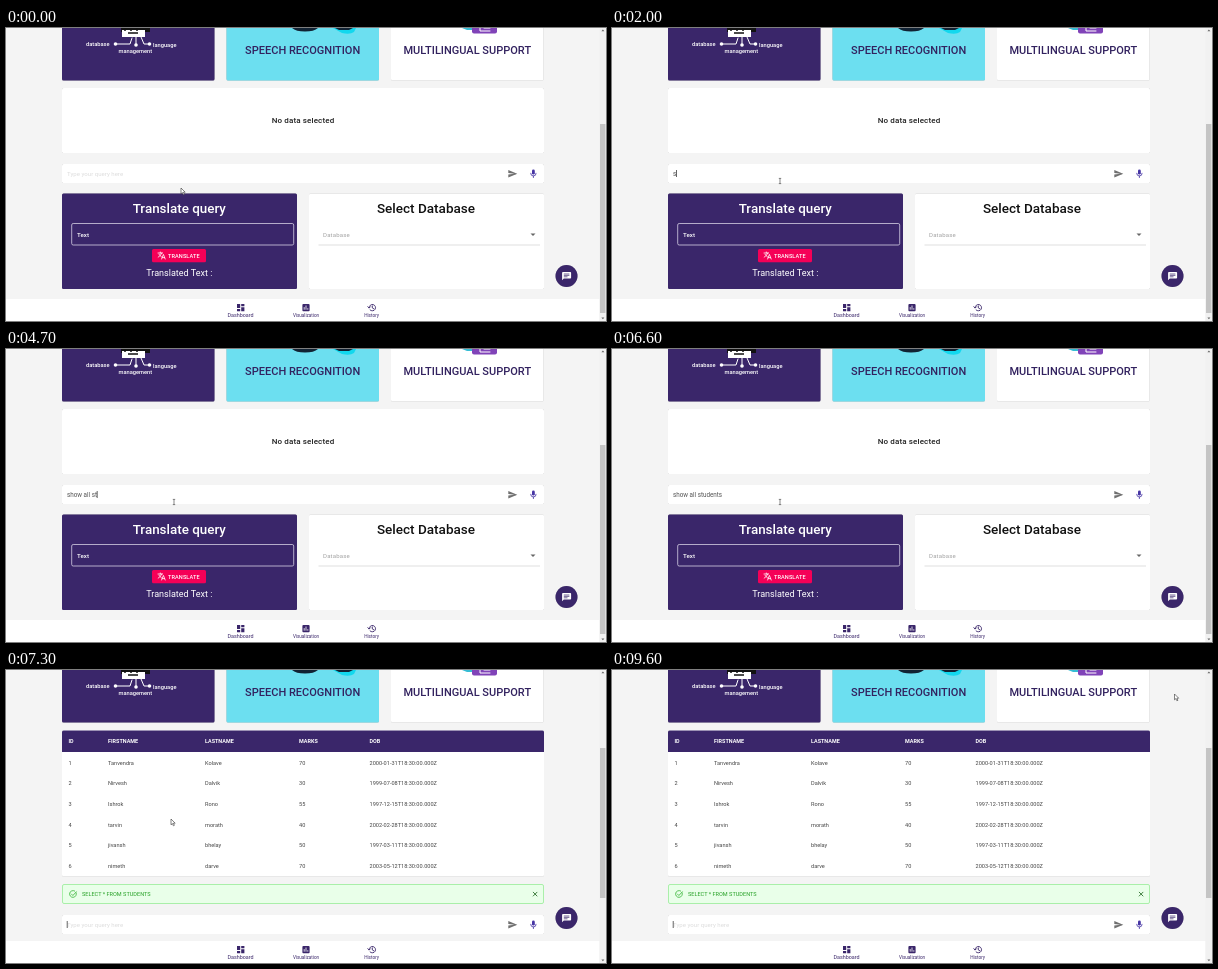
An HTML page for the animation above (9.7 s loop, 600 by 293 pixels).

```html
<!DOCTYPE html>
<html lang="en">
<head>
<meta charset="utf-8">
<title>Query dashboard</title>
<style>
  html, body { margin: 0; height: 100%; overflow: hidden; background: #f4f4f4; }
  svg { display: block; width: 100vw; height: 100vh; font-family: Roboto, sans-serif; }
  .card { fill: #fff; filter: drop-shadow(0 .6px .7px rgba(0, 0, 0, .28)); }
  .purple { fill: #3a266a; }
  .mid { text-anchor: middle; }
  .med { font-weight: 500; }
  .line { fill: none; stroke-linecap: round; }
  #typed { white-space: pre; }
</style>
</head>
<body>
<svg viewBox="0 0 600 293">
  <rect width="600" height="293" fill="#f4f4f4"/>

  <!-- feature cards -->
  <rect class="card purple" x="56" y="-10" width="152.5" height="62.5" rx="1.5"/>
  <rect x="115" width="29" height="4" fill="#111"/>
  <rect x="116" y="2" width="23" height="7" fill="#fff"/>
  <path d="M119 0v3M125 0v3M131 0v3M122 5h10" stroke="#111" stroke-width="1.5"/>
  <path class="line" stroke="#fff" stroke-width="1" d="M110 16h14l2-6M130 9v8M135 9l3 7h6"/>
  <g fill="#fff">
    <circle cx="109.5" cy="16" r="1.8"/><circle cx="130" cy="17" r="1.8"/><circle cx="143.5" cy="16" r="1.8"/>
    <g class="med" font-size="5.7">
      <text x="80" y="18">database</text>
      <text x="112.5" y="25">management</text>
      <text x="147" y="19">language</text>
    </g>
  </g>
  <rect class="card" style="fill:#6cdff0" x="220.5" y="-10" width="152.5" height="62.5" rx="1.5"/>
  <path d="M286 0h26q-4 3.5-13 3.5T286 0z" fill="#123"/>
  <path d="M327 0h23l-2 4q-4 3-12 1z" fill="#12d8ee"/>
  <path d="M329 0h18l-4 2h-10z" fill="#123"/>
  <rect class="card" x="385" y="-10" width="152.5" height="62.5" rx="1.5"/>
  <path d="M456 0h10v2h-5z" fill="#35bcd4"/>
  <path d="M466 0h25v3.5q0 2-2 2h-21q-2 0-2-2z" fill="#8043b8"/>
  <path d="M474 0v3h10M478 0h6" class="line" stroke="#fff"/>
  <g class="mid med" font-size="11" fill="#32225f">
    <text x="296.7" y="26">SPEECH RECOGNITION</text>
    <text x="461.3" y="26">MULTILINGUAL SUPPORT</text>
  </g>

  <rect id="panel" class="card" x="56" y="60" width="482" height="65" rx="1.5"/>
  <text id="empty" class="mid med" x="297" y="95" font-size="8" letter-spacing=".13" fill="#222">No data selected</text>
  <path id="spinner" fill="none" stroke="#32225f" stroke-width="3"/>

  <g id="result">
    <path class="purple" d="M56 82V62q0-1.5 1.5-1.5h479q1.5 0 1.5 1.5v20z"/>
    <g id="table" font-size="5.6" fill="#444"></g>
    <rect x="56.5" y="214.5" width="481" height="19" rx="1.5" fill="#e9ffe9" stroke="#98ec98" stroke-width=".8"/>
    <g class="line" stroke="#35b435" stroke-width=".8">
      <path d="M70.2 222.8a3.4 3.4 0 1 1-1.5-1.8M65.4 224l1.5 1.5 3.4-3.7"/>
      <path d="M527.2 222.2l3.8 3.8m0-3.8l-3.8 3.8" stroke="#176017"/>
    </g>
    <text x="76" y="226" font-size="5.57" fill="#25a025">SELECT * FROM STUDENTS</text>
  </g>

  <g id="lower">
    <rect class="card" x="56" y="136" width="482" height="19" rx="1.5"/>
    <text id="hint" x="61" y="147.7" font-size="6.1" fill="#dcdcdc">Type your query here</text>
    <text id="typed" x="61" y="147.7" font-size="6.3" fill="#555"></text>
    <rect id="caret" y="142" width=".7" height="7" fill="#222"/>
    <path d="M502.3 142l9 3.8-9 3.8v-3l6-.8-6-.8z" fill="#707070"/>
    <rect x="526" y="141.6" width="2.8" height="5" rx="1.4" fill="#4634a4"/>
    <path class="line" d="M524.7 145.3a2.7 2.7 0 0 0 5.4 0M527.4 148v1.6" stroke="#4634a4" stroke-width=".8"/>

    <rect class="card purple" x="56" y="165.5" width="235" height="95.5" rx="1.5"/>
    <rect x="65.7" y="195.5" width="222" height="21.5" rx="1.5" fill="none" stroke="#d5cfe2" stroke-width=".8"/>
    <rect x="146" y="221" width="54" height="13.3" rx="1.5" fill="#f50057"/>
    <path class="line" stroke="#fff" stroke-width=".8" d="M152 225h4.6M154.3 224v1M155.8 225q-.8 2.6-3.6 4.2M153 226.3q.8 1.5 2.4 2.4M155.6 231l1.8-4.6 1.8 4.6M156.2 229.6h2.4"/>
    <g fill="#fff">
      <text class="mid med" x="173.2" y="184.5" font-size="13.4">Translate query</text>
      <text class="med" x="71" y="208.6" font-size="6.2">Text</text>
      <text class="med" x="162" y="229.7" font-size="5.6" letter-spacing=".08">TRANSLATE</text>
      <text class="mid" x="173.3" y="248" font-size="9.05">Translated Text :</text>
    </g>

    <rect class="card" x="303" y="165.5" width="235" height="95.5" rx="1.5"/>
    <text class="mid med" x="420" y="184.5" font-size="13.5" fill="#111">Select Database</text>
    <text x="317" y="208.7" font-size="6" letter-spacing=".2" fill="#a0a0a0">Database</text>
    <path d="M312.5 217H534" stroke="#d2d2d2" stroke-width=".7"/>
    <path d="M524.5 205.5h5l-2.5 2.6z" fill="#666"/>
  </g>

  <!-- bottom navigation -->
  <rect class="card" x="-2" y="271" width="597" height="30"/>
  <g class="purple">
    <path d="M231 276h3.2v4H231zM231 281h3.2v2.3H231zM235.2 276h3.2v2.3h-3.2zM235.2 279.3h3.2v4h-3.2z"/>
    <rect x="296.4" y="276" width="7.2" height="7.2" rx=".9"/>
    <g class="mid">
      <text x="234.5" y="289" font-size="5.4">Dashboard</text>
      <text x="300" y="288.6" font-size="4.6">Visualization</text>
      <text x="365.6" y="288.6" font-size="4.7">History</text>
    </g>
  </g>
  <path d="M298.2 281.7v-2.6M300 281.7v-4.2M301.8 281.7v-1.5" stroke="#fff" stroke-width=".8"/>
  <path class="line" stroke="#3a266a" stroke-width=".9" d="M363.1 279.7a3.2 3.2 0 1 1 1 2.3M361.8 278.7l1.3 1.4 1.4-1.4M366.3 277.9v2l1.5.9"/>

  <circle class="card purple" cx="560.5" cy="248" r="11"/>
  <path d="M557 244h7.3q.8 0 .8.8v4.9q0 .8-.8.8h-6.5l-1.7 1.8v-7.5q0-.8.9-.8z" fill="#fff"/>
  <path d="M557.8 246h5.6M557.8 247.4h5.6M557.8 248.8h3.7" stroke="#3a266a" stroke-width=".7"/>

  <!-- scrollbar -->
  <rect x="593.3" width="6.7" height="293" fill="#f1f1f1"/>
  <rect id="thumb" x="594" width="5.4" fill="#c4c4c4"/>
  <path d="M595.4 3.2l1.5-1.6 1.5 1.6zM595.4 289.6l1.5 1.6 1.5-1.6z" fill="#666"/>

  <path id="arrow" d="M0 0v5.8l1.4-1.2 1 2.2 1-.5-1-2.1h1.8z" fill="#fff" stroke="#333" stroke-width=".6"/>
  <path id="beam" d="M-1.2-2.6h2.4M0-2.6v5.2M-1.2 2.6h2.4" fill="none" stroke="#555" stroke-width=".7"/>
</svg>
<script>
const $ = id => document.getElementById(id);
const show = (id, on) => $(id).style.display = on ? '' : 'none';
const LOOP = 9700, LOAD = 7000, DONE = 7300;
const query = 'show all students';
const keys = [2000, 2300, 2600, 2800, 3100, 3500, 3800, 4000, 4300, 4400,
  4700, 5000, 5200, 5300, 5500, 5600, 5800];
// The caret blink restarts at each of these times.
const blinks = [1000, ...keys, 6900, DONE];
// Pointer stops: time, x, y
const stops = [[100, 175, 160], [700, 168, 153], [7200, 168, 153], [DONE, 165, 149],
  [7600, 165, 149], [8600, 566, 22], [9000, 562.5, 24]];

const columns = [62.5, 102, 199, 293, 363.5];
const rows = [
  ['Tanvendra', 'Kolave', 70, '2000-01-31'],
  ['Nirvesh', 'Dalvik', 30, '1999-07-08'],
  ['Ishrok', 'Rono', 55, '1997-12-15'],
  ['tarvin', 'morath', 40, '2002-02-28'],
  ['jivansh', 'bhelay', 50, '1997-03-11'],
  ['nimeth', 'darve', 70, '2003-05-12']
];
const line = (cells, y, attrs = '') => cells.map((cell, i) =>
  `<text x="${columns[i]}" y="${y}" ${attrs}>${cell}</text>`).join('');
$('table').innerHTML =
  line(['ID', 'FIRSTNAME', 'LASTNAME', 'MARKS', 'DOB'], 73.2, 'fill="#fff" font-weight="700" font-size="5.45"') +
  rows.map(([first, last, marks, day], i) =>
    line([i + 1, first, last, marks, day + 'T18:30:00.000Z'], 94.8 + i * 20.6)).join('');

function pointer(t) {
  const i = stops.findIndex(s => s[0] > t);
  if (i < 1) return (i ? stops.at(-1) : stops[0]).slice(1);
  const [t0, x0, y0] = stops[i - 1], [t1, x1, y1] = stops[i];
  const p = (t - t0) / (t1 - t0), e = p * p * (3 - 2 * p);
  return [x0 + (x1 - x0) * e, y0 + (y1 - y0) * e];
}

function arc(cx, cy, r, from, sweep) {
  const at = deg => {
    const a = deg * Math.PI / 180;
    return `${cx + r * Math.cos(a)} ${cy + r * Math.sin(a)}`;
  };
  return `M${at(from)}A${r} ${r} 0 0 1 ${at(from + sweep)}`;
}

function draw(t) {
  const done = t >= DONE, loading = t >= LOAD && !done;
  const text = done ? '' : query.slice(0, keys.filter(k => k <= t).length);

  $('typed').textContent = text;
  show('hint', !text);
  const last = blinks.filter(b => b <= t).pop();
  show('caret', last !== undefined && (t - last) % 1000 < 500);
  $('caret').setAttribute('x', 60.8 + (text ? $('typed').getComputedTextLength() : 0));

  show('empty', t < LOAD);
  show('spinner', loading);
  const age = t - LOAD;
  if (loading) $('spinner').setAttribute('d', arc(297, 95, 10.8, age * 360 / 1400, age * .15 + 1));
  show('result', done);
  $('panel').setAttribute('height', done ? 146.5 : loading ? 67 : 65);
  $('lower').setAttribute('transform', `translate(0 ${done ? 109 : loading ? 2 : 0})`);
  $('thumb').setAttribute('y', done ? 78 : 96);
  $('thumb').setAttribute('height', done ? 150 : 189);

  const [x, y] = pointer(t), overInput = !done && y < 155;
  show('arrow', !overInput);
  show('beam', overInput);
  $(overInput ? 'beam' : 'arrow').setAttribute('transform', `translate(${x} ${y})`);
}

const start = performance.now();
function tick() {
  const t = (performance.now() - start) % LOOP;
  draw(Math.floor(t / 100) * 100);
  requestAnimationFrame(tick);
}
tick();
</script>
</body>
</html>
```
